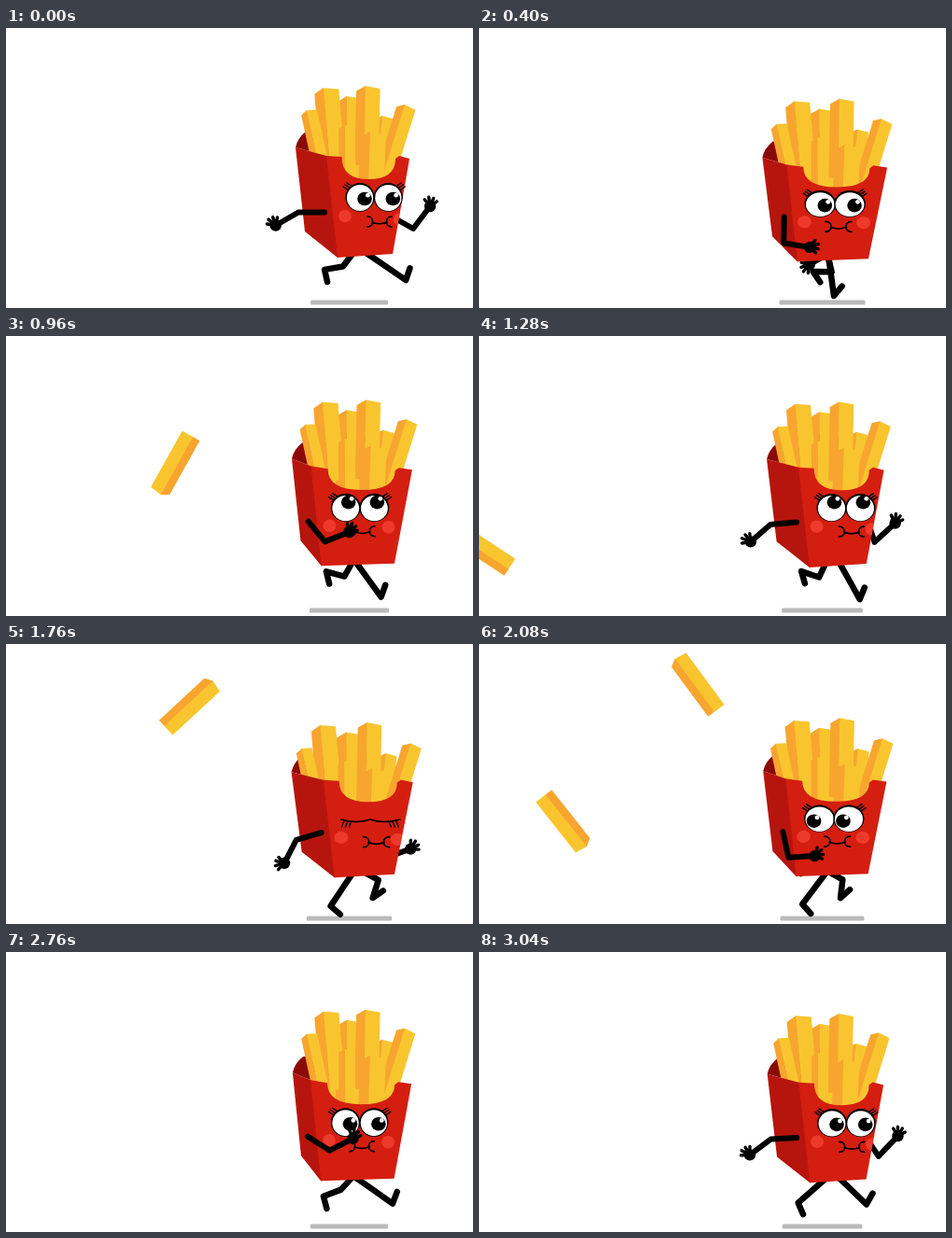
These frames come from a looping animation (500x300 px, 3.08 s). An HTML page with a canvas:

```html
<!DOCTYPE html>
<html lang="en">
<head>
<meta charset="utf-8">
<title>Running fries</title>
<style>
html, body { margin: 0; width: 100%; height: 100%; overflow: hidden; background: #fff; }
canvas { display: block; }
</style>
</head>
<body>
<canvas id="stage" width="500" height="300"></canvas>
<script>
const g = document.getElementById('stage').getContext('2d');
const LOOP = 3080, STRIDES = 5, TAU = 2 * Math.PI, DEG = Math.PI / 180;
const RED = '#d41e10', SIDE = '#b6150e', INNER = '#8a0a08', CHEEK = '#ee3a2b';
const YELLOW = '#f9c52f', ORANGE = '#f7a52f';

// Peak x, peak y and width, back to front
const fries = [[403, 94, 20], [365, 73, 32], [385, 62, 26], [340, 64, 27],
  [427, 82, 21], [322, 88, 18], [363, 104, 18], [390, 111, 28]];

const throws = [
  { start: 590, vx: 550, vy: 25, fall: 590 },
  { start: 1195, vx: 333, vy: 356, fall: 1020 },
  { start: 1848, vx: 647, vy: 586, fall: 2770 }];

// Ankle path over one stride: phase, x from hip, height
const stride = [[0, 41, 270], [.07, 24, 281], [.15, 6, 287], [.357, -24, 281],
  [.46, -30, 265], [.57, -27, 252], [.65, -16, 261], [.86, 9, 272]];

// Smooth closed curve through keys, phase in 0..1
function along(keys, u) {
  const n = keys.length, i = keys.findLastIndex(k => k[0] <= u);
  const [a, b, c, d] = [i - 1, i, i + 1, i + 2].map(j => {
    const lap = Math.floor(j / n), [t, ...v] = keys[j - lap * n];
    return [t + lap, ...v];
  });
  const h = c[0] - b[0], s = (u - b[0]) / h;
  return [1, 2].map(j => {
    const m = (c[j] - a[j]) / (c[0] - a[0]) * h, k = (d[j] - b[j]) / (d[0] - b[0]) * h;
    const e = s * s * (3 - 2 * s);
    return b[j] + (c[j] - b[j]) * e + s * (1 - s) * (m * (1 - s) - k * s);
  });
}

function ramp(t, from) {
  const s = Math.min(1, Math.max(0, (t - from) / 140));
  return s * s * (3 - 2 * s);
}

function trace(p) {
  g.beginPath();
  for (let i = 0; i < p.length; i += 2) g.lineTo(p[i], p[i + 1]);
}
function poly(color, ...p) {
  trace(p);
  g.fillStyle = color;
  g.fill();
}
function line(width, ...p) {
  trace(p);
  g.lineWidth = width;
  g.stroke();
}
function oval(color, x, y, rx, ry = rx) {
  g.beginPath();
  g.ellipse(x, y, rx, ry, 0, 0, TAU);
  g.fillStyle = color;
  g.fill();
}
function polar(x, y, angle, r) {
  return [x + r * Math.cos(angle * DEG), y + r * Math.sin(angle * DEG)];
}

// A fry hanging down from its peak, turned about (x, y)
function fry(x, y, tilt, w, len, ox = 0, oy = 0) {
  g.save();
  g.translate(x, y);
  g.rotate(tilt * DEG);
  g.translate(ox, oy);
  poly(YELLOW, -.5, 0, .6 * w, .1 * w, .6 * w, len, -.5, len);
  poly(ORANGE, -.38 * w, .22 * w, 0, 0, 0, len, -.38 * w, len);
  g.restore();
}

function leg(hipX, hipY, u) {
  const [dx, y] = along(stride, u), x = hipX + dx;
  const dist = Math.hypot(dx, y - hipY);
  const grow = Math.max(1, dist / 37), thigh = 17 * grow, shin = 20 * grow;
  const run = (thigh ** 2 - shin ** 2 + dist ** 2) / (2 * dist);
  const bend = Math.sqrt(Math.max(0, thigh ** 2 - run ** 2));
  const cx = dx / dist, cy = (y - hipY) / dist;
  const foot = 3 - 74 * Math.cos(TAU * u) - 12 * Math.sin(TAU * u);
  line(6.5, hipX, hipY, hipX + cx * run + cy * bend, hipY + cy * run - cx * bend,
    x, y, ...polar(x, y, foot, 13.5));
}

function arm(sx, sy, ex, ey, angle, len, wrist) {
  const hand = polar(ex, ey, angle, len);
  line(6, sx, sy, ex, ey, ...hand);
  oval('#000', ...hand, 6.2);
  for (let i = -1; i < 3; i++)
    line(3.4, ...hand, ...polar(...hand, angle + wrist + i * 31 - 15, 10 - Math.abs(i) * .6));
}

function openEye(x, y, rx, ry, side, dx, dy) {
  for (let i = 0; i < 3; i++) {
    const u = -8 - 2 * i, v = -12 + 2 * i;
    line(1.4, x + side * u, y + v, x + side * (u - 6), y + v - 4);
  }
  oval('#000', x, y - .7, rx + .9, ry + .9);
  oval('#fff', x, y, rx - .5, ry - .5);
  oval('#000', x + dx, y + dy, 7.8, 7.3);
  oval('#fff', x + dx + 3.4, y + dy - 3.8, 2.4);
}

function closedEyes(x, y) {
  g.beginPath();
  g.moveTo(x - 31, y);
  g.quadraticCurveTo(x - 15, y + 5, x, y);
  g.quadraticCurveTo(x + 15, y + 5, x + 32, y);
  g.lineWidth = 1.6;
  g.stroke();
  for (const side of [-1, 1])
    for (let u = 20; u < 30; u += 4)
      line(1.3, x + side * u, y + 2, x + side * (u + 2.5), y + 8);
}

function mouth(x, y, k) {
  g.beginPath();
  for (const s of [-k, k]) {
    g.moveTo(x + s * 13, y - 5);
    g.bezierCurveTo(x + s * 5.5, y - 5, x + s * 5.5, y + 6, x + s * 13, y + 6);
  }
  g.moveTo(x - 8 * k, y + 1);
  g.quadraticCurveTo(x, y + 4.5, x + 8 * k, y + 1);
  g.lineWidth = 1.7;
  g.stroke();
}

function drawThrown(ms) {
  for (const { start, vx, vy, fall } of throws) {
    const t = (ms - start) / 1000;
    // Hidden behind the box just after launch
    if (t > .1) fry(385 - vx * t, 105 - vy * t + fall * t * t / 2, 157 - 830 * t, 22, 71, -3, -37);
  }
}

function draw(ms) {
  const p = ms * STRIDES / LOOP % 1;
  const turn = (1 + Math.cos(TAU * p)) / 2;
  const bob = Math.abs(Math.sin(TAU * p)) ** 1.7;
  // Point blended between the two facings, lowered by the bob
  const pt = (x1, y1, x0, y0, bx, by) =>
    [x0 + (x1 - x0) * turn + bx * bob, y0 + (y1 - y0) * turn + by * bob];

  g.fillStyle = '#fff';
  g.fillRect(0, 0, 500, 300);
  g.lineCap = g.lineJoin = 'round';
  g.strokeStyle = '#000';

  const half = 41.5 + 6.5 * bob;
  g.fillStyle = '#bababa';
  g.beginPath();
  g.roundRect(367.5 - half, 291.5, 2 * half, 5, 1.5);
  g.fill();

  drawThrown(ms);

  const hipY = 242 + 4 * bob;
  leg(375 - 4 * turn, hipY, (p + .5) % 1);
  leg(370 + 17 * turn, hipY, p);

  const reach = turn ** 4, back = 1 - turn;
  arm(400 + 20 * turn, 206, 380 + 56 * reach, 236 - 21 * reach + 4 * bob,
    -53 + 163 * back + 120 * back * back, 30, -30 * turn);

  const sideTop = pt(310, 128, 307, 129, -6, 14), sideLow = pt(320, 218, 316, 218, -4, 7.5);
  const edgeTop = pt(343, 137, 326, 137, 0, 13.5), edgeLow = pt(355, 246, 337, 245, 0, 7);
  const rightTop = pt(432, 140, 434, 141, 5, 12.5), rightLow = pt(414, 242, 415.5, 242.5, 2.5, 7);
  const lipL = pt(359.5, 138, 344, 140, 0, 13), lipR = pt(417, 140, 416, 142, 3, 12.5);
  const [dipX, dipY] = pt(388, 162, 380, 163, 2, 11);

  const [tx, ty] = sideTop;
  g.beginPath();
  g.moveTo(tx, ty);
  g.quadraticCurveTo(tx + 2, ty - 10, tx + 11, ty - 17);
  g.lineTo(tx + 70, ty - 30);
  g.lineTo(tx + 95, ty - 10);
  g.lineTo(...edgeTop);
  g.fillStyle = INNER;
  g.fill();

  poly(YELLOW, ...lipL, lipL[0], dipY, lipR[0], dipY, ...lipR);
  const drop = 26 * bob - 3 * Math.sin(2 * TAU * p) + 3.5 * Math.sin(4 * TAU * p);
  for (const [x, y, w] of fries) {
    // Fries further from the middle lean and spread more
    const off = x - 370, spread = off / 190;
    fry(x + spread * drop, y + drop * (1 + .5 * Math.abs(spread)), .0053 * off * Math.abs(off), w, 85);
  }

  poly(SIDE, ...sideTop, ...edgeTop, edgeTop[0] + 1, edgeTop[1],
    edgeLow[0] + 1, edgeLow[1], ...edgeLow, ...sideLow);
  g.save();
  g.beginPath();
  g.moveTo(...edgeTop);
  g.lineTo(...lipL);
  g.quadraticCurveTo(lipL[0], dipY, dipX, dipY);
  g.quadraticCurveTo(lipR[0], dipY, ...lipR);
  g.lineTo(lipR[0] + 4, lipR[1] - 3);
  g.lineTo(...rightTop);
  g.lineTo(...rightLow);
  g.lineTo(...edgeLow);
  g.closePath();
  g.fillStyle = RED;
  g.fill();
  g.clip();
  oval(CHEEK, ...pt(363, 201.5, 346, 201.5, -1.5, 9), 6.8 + bob, 6.8 - .4 * bob);
  oval(CHEEK, ...pt(421.5, 205, 409, 203.5, 0, 7), 6.8 + bob, 6.8 - .4 * bob);
  g.restore();

  const [ex, ey] = pt(379, 182, 363.5, 183, -2, 9);
  if (ms >= 1690 && ms < 1830) {
    closedEyes(ex + 15, ey);
  } else {
    const up = ramp(ms, 560) - ramp(ms, 1690), left = ramp(ms, 1690) - ramp(ms, 2600);
    const look = [5 - 2 * up - 11 * left, 1 - 7.5 * up + left];
    const rx = 14.6 + 1.8 * bob, ry = 14.5 - 1.5 * bob;
    openEye(ex, ey, rx, ry, 1, ...look);
    openEye(ex + 30.3 + 2 * bob, ey, rx, ry, -1, ...look);
  }
  mouth(...pt(400, 207, 381, 207.5, 0, 7), 1 + .1 * bob);

  const sx = 323 + 18 * turn, sy = 197.5 + 7 * bob;
  arm(sx, sy, ...polar(sx, sy, 26 + 154 * turn ** .55, 28), -28 + 178 * turn, 28, -40 + 125 * turn);
}

const start = performance.now();
function tick() {
  draw((performance.now() - start) % LOOP);
  requestAnimationFrame(tick);
}
tick();
</script>
</body>
</html>
```
